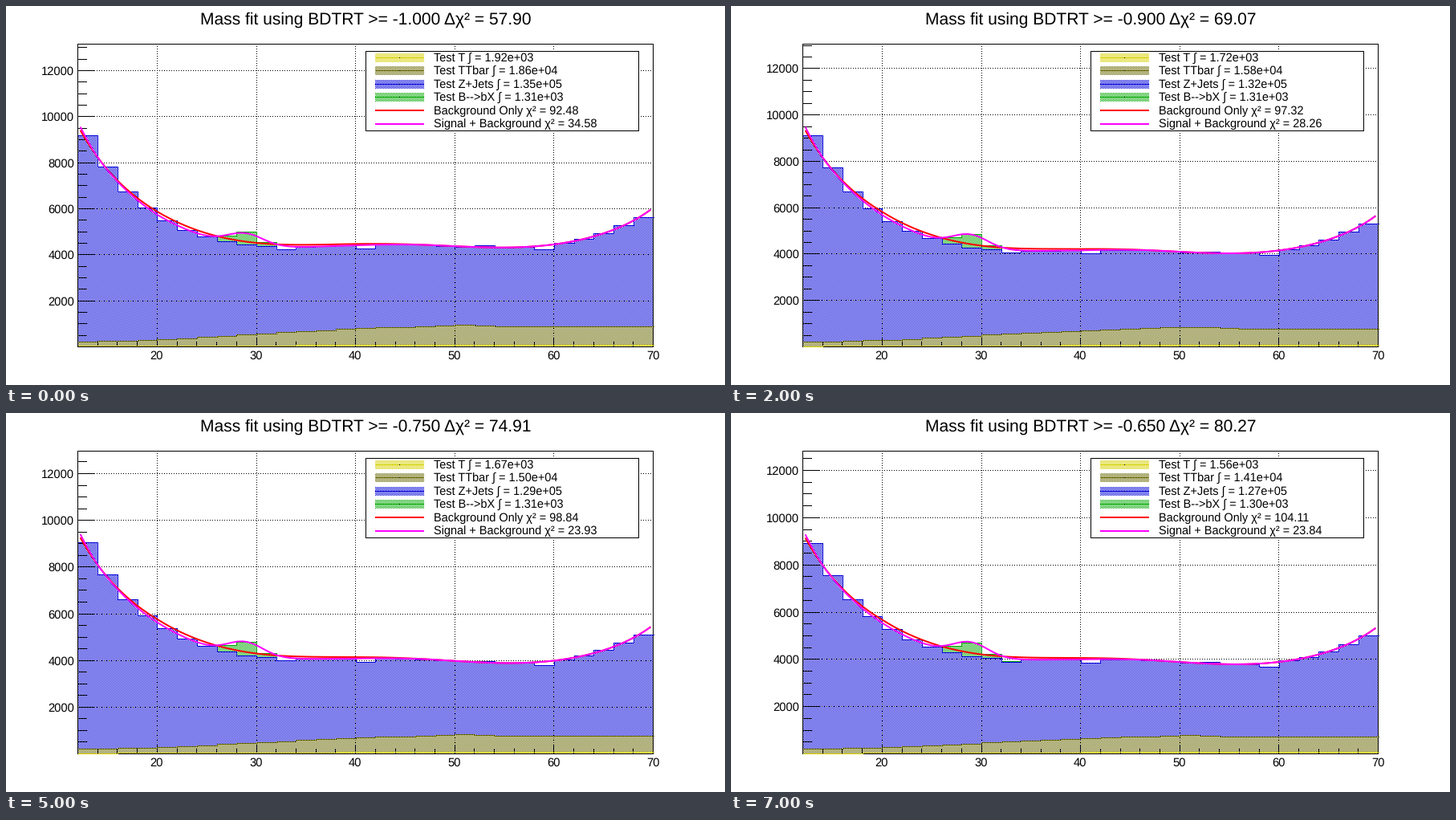
Write a matplotlib script that moves like this. It is 896 px wide and 472 px high and loops after 8 s.

```python
import matplotlib.pyplot as plt
import numpy as np
from matplotlib.animation import FuncAnimation
from matplotlib.colors import to_rgb
from numpy.polynomial import Polynomial

W, H, DPI, STEPS = 896, 472, 64, 8
PT = 72 / DPI                                   # points per pixel
LEFT, RIGHT, TOP, BASE = 89, 806, 47, 424       # plot frame, in pixels
X_MIN, X_MAX = 12, 70
YELLOW, OLIVE, BLUE, GREEN = "#d6d000", "#666600", "#0000d8", "#00a800"
RED, MAGENTA = "#ff0000", "#ff00ff"
LAYERS = (YELLOW, OLIVE, BLUE, GREEN)

plt.rcParams.update({"font.family": "Liberation Sans", "text.hinting": "none"})

# Readings at a few steps of the cut; the steps between are interpolated
KEY_STEPS = [0, 1, 3, 5, 6, 7]
READINGS = {
    "T": [1920, 1760, 1680, 1670, 1650, 1560],
    "TTbar": [18600, 16400, 15300, 15000, 14800, 14100],
    "Z+Jets": [135e3, 133e3, 131e3, 129e3, 129e3, 127e3],
    "B-->bX": [1310, 1310, 1310, 1310, 1310, 1300],
    "bkg": [92.48, 95.643, 99.004, 98.84, 100.98, 104.11],
    "sig": [34.58, 30.956, 25.556, 23.93, 24.13, 23.84],
    "row_12k": [80, 78.9, 76, 75, 73, 71],      # pixel row of y = 12000
}

EDGES = np.arange(X_MIN, X_MAX + 1, 2)
MIDS = EDGES[:-1] + 1
CURVE_X = np.linspace(12.25, 69.75, 110)
FIT = Polynomial.fit(
    [12.2, 14, 17, 20, 24, 28, 34, 40, 46, 52, 58, 66, 69.75],
    [9470, 8180, 6870, 5880, 5040, 4640, 4455, 4460, 4430, 4365, 4350, 5090, 5960], 8)


def reading(name, i):
    return np.interp(i, KEY_STEPS, READINGS[name])


def to_px(x):
    return LEFT + .5 + (np.asarray(x) - X_MIN) * (RIGHT - LEFT) / (X_MAX - X_MIN)


def to_py(y, scale):
    return BASE + .5 - np.asarray(y) * scale


def to_row(y, scale):
    return int(round(BASE - y * scale))


def bell(x, centre, width):
    return np.exp(-((x - centre) / width) ** 2 / 2)


def progress(i):
    """How far the left, middle and right of the plot have sunk, 0 to 1."""
    left = (80 - reading("row_12k", i)) / 9
    middle = (18600 - reading("TTbar", i)) / 4500
    return left, middle, (i / (STEPS - 1)) ** .56


def only_background(x, i):
    left, middle, right = progress(i)
    return FIT(x) - np.interp(x, [12, 20, 40, 70],
                              [270 * left, 200 * left, 410 * middle, 635 * right])


def without_peak(x, i):
    return only_background(x, i) + np.interp(
        x, [12.2, 14, 20, 25, 29, 33, 40, 47], [150, 0, -135, -150, -130, -100, -60, 0])


def with_peak(x, i):
    return without_peak(x, i) + (500 + 90 * progress(i)[1]) * bell(x, 28.9, 1.8)


def scatter(x):
    """Bin-to-bin deviation from the smooth shape."""
    bumps = ((13, 240), (15, 150), (33, -100), (41, -150), (53, 70), (59, -150), (69, -110))
    return sum(size * bell(x, centre, .6) for centre, size in bumps)


def histograms(i):
    """Cumulative bin heights: T, T + TTbar, all background, with signal."""
    t = np.clip((MIDS - X_MIN) / 37, 0, 1)
    rise = t * t * (3 - 2 * t)
    middle = progress(i)[1]
    single = (38 + 52 * rise) * reading("T", i) / 1920
    ttbar = 240 - 25 * middle + (650 - 135 * middle) * rise + 70 * bell(MIDS, 51, 2)
    background = without_peak(MIDS, i) + scatter(MIDS)
    return single, ttbar, background, background + 570 * bell(MIDS, 28.8, 1.45)


ROWS, COLS = np.mgrid[:H, :W]
CHECKER = (ROWS + COLS) % 2 == 0
BIN = np.clip(((COLS - LEFT) * len(MIDS)) // (RIGHT - LEFT), 0, len(MIDS) - 1)
INSIDE = (COLS >= LEFT) & (COLS <= RIGHT) & (ROWS <= BASE)


def box(img, x0, y0, x1, y1):
    img[[y0, y1], x0:x1 + 1] = 0
    img[y0:y1 + 1, [x0, x1]] = 0


def hatch(img, area, color):
    img[area] = 1
    img[area & CHECKER] = to_rgb(color)


def draw_axes(img, scale):
    y_max = int((BASE - TOP) / scale)
    for y in range(2000, y_max, 2000):
        img[to_row(y, scale), LEFT:RIGHT:3] = 0
    for x in range(20, X_MAX, 10):
        img[TOP:BASE:3, int(to_px(x))] = 0
    for y in range(500, y_max, 500):
        img[to_row(y, scale), LEFT:LEFT + (22 if y % 2000 == 0 else 12)] = 0
    for x in range(14, X_MAX, 2):
        img[BASE - (11 if x % 10 == 0 else 6):BASE, int(to_px(x))] = 0
    box(img, LEFT, TOP, RIGHT, BASE)


def draw_legend(img):
    img[56:156, 448:789] = 1
    box(img, 448, 56, 788, 155)
    for n, color in enumerate(LAYERS):
        y = int(59 + 16.5 * n)
        hatch(img, (ROWS >= y) & (ROWS < y + 11) & (COLS >= 460) & (COLS <= 520), color)
        img[y + 5, 460:521] = to_rgb(color)
        img[y + 5, 490] = 0


def backdrop(scale, heights):
    img = np.ones((H, W, 3))
    values = (BASE - ROWS) / scale
    for tops, color in zip(heights[::-1], LAYERS[::-1]):
        hatch(img, INSIDE & (values <= tops[BIN]), color)
    draw_axes(img, scale)
    draw_legend(img)
    return img


fig = plt.figure(figsize=(W / DPI, H / DPI), dpi=DPI, facecolor="white")
ax = fig.add_axes([0, 0, 1, 1])
ax.axis("off")
picture = ax.imshow(np.ones((H, W, 3)), aspect="auto", extent=(0, W, H, 0),
                    interpolation="nearest")
ax.set_xlim(0, W)
ax.set_ylim(H, 0)


def line(color, width=1, smooth=False, x=(), y=()):
    return ax.plot(x, y, color=color, lw=width * PT, antialiased=smooth,
                   solid_capstyle="butt", solid_joinstyle="miter")[0]


def label(x, y, text="", size=14.5, ha="left"):
    return ax.text(x, y, text, fontsize=size * PT, ha=ha, va="baseline")


# Signal first, so that the background outline covers it where they meet
outlines = [line(color) for color in LAYERS[::-1]]
curves = [line(color, 2, True) for color in (RED, MAGENTA)]
for color, y in ((RED, 130), (MAGENTA, 147)):
    line(color, 2, False, (460, 521), (y, y))

title = label(448, 23, size=21, ha="center")
legend = [label(533, 68.5 + 16.5 * n) for n in range(6)]
y_labels = [label(85, 0, str(v), 14.8, "right") for v in range(2000, 12001, 2000)]
for v in range(20, 71, 10):
    label(to_px(v) - .5, 440, str(v), 14.8, "center")


def update(i):
    scale = (BASE - reading("row_12k", i)) / 12000
    heights = histograms(i)
    picture.set_data(backdrop(scale, heights))
    for outline, tops in zip(outlines, heights[::-1]):
        outline.set_data(to_px(np.repeat(EDGES, 2)[1:-1]),
                         to_py(np.repeat(tops, 2), scale))
    for curve, shape in zip(curves, (only_background, with_peak)):
        curve.set_data(to_px(CURVE_X), to_py(shape(CURVE_X, i), scale))
    for n, text in enumerate(y_labels, 1):
        text.set_y(to_row(2000 * n, scale) + 5.5)

    bkg, sig = reading("bkg", i), reading("sig", i)
    title.set_text(f"Mass fit using BDTRT >= {-1 + .05 * i:.3f} Δχ² = {bkg - sig:.2f}")
    entries = [f"Test {name} ∫ = {reading(name, i):.2e}"
               for name in ("T", "TTbar", "Z+Jets", "B-->bX")]
    entries += [f"Background Only χ² = {bkg:.2f}", f"Signal + Background χ² = {sig:.2f}"]
    for text, entry in zip(legend, entries):
        text.set_text(entry)
    return []


anim = FuncAnimation(fig, update, frames=STEPS, interval=1000,
                     init_func=lambda: update(0), repeat=True, repeat_delay=0, blit=False)
plt.show()
```
